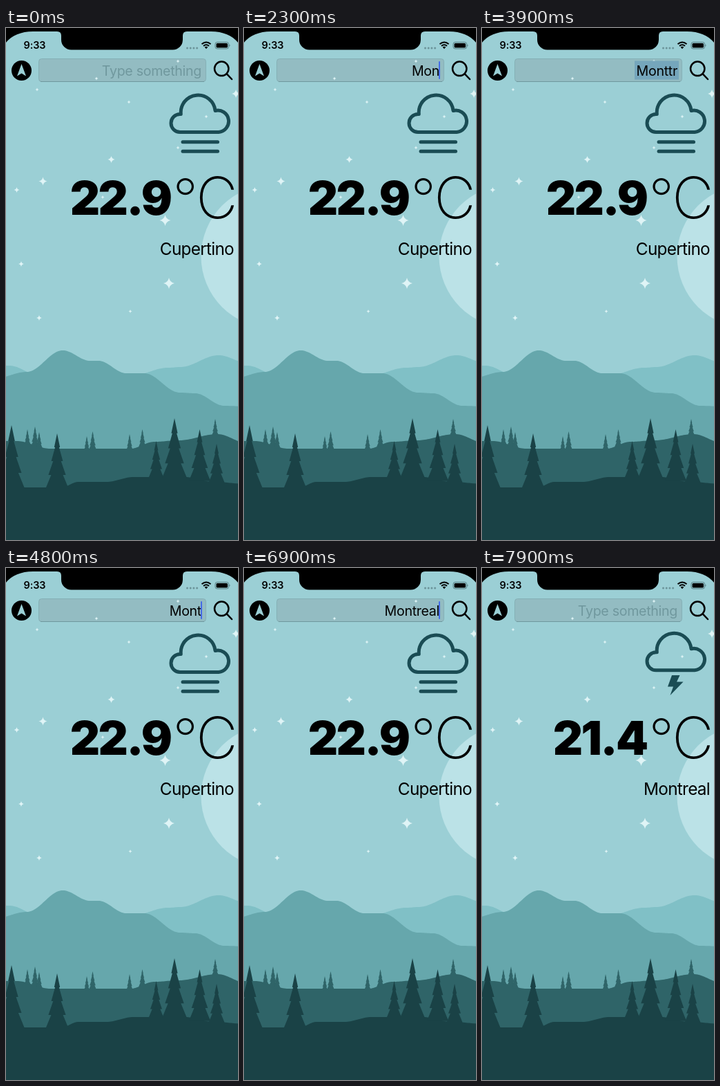
Write an HTML page that moves like this. It is 336 by 740 pixels and loops after 8 s.

```html
<!DOCTYPE html>
<html lang="en">
<head>
<meta charset="utf-8">
<title>Weather</title>
<style>
html, body { margin: 0; width: 100%; height: 100%; overflow: hidden; background: #000; }
svg { display: block; width: 336px; height: 740px; }
text { font-family: Inter, "Liberation Sans", sans-serif; }
.end { text-anchor: end; }
.input { font-size: 19.6px; letter-spacing: -.3px; }
.line { fill: none; stroke: #1a4c54; stroke-width: 5; stroke-linecap: round; stroke-linejoin: round; }
</style>
</head>
<body>
<svg viewBox="0 0 336 740">
  <rect width="336" height="740" fill="#9bcfd5"/>
  <circle cx="386" cy="330" r="103.5" fill="#bbe2e7"/>
  <g id="land"></g>

  <rect x="47.5" y="44.5" width="242" height="33" rx="4" fill="#787880" fill-opacity=".22" stroke="#7aa3a9" stroke-opacity=".6"/>
  <path d="M50 77.5H287" stroke="#6f989e"/>
  <path id="stars" fill="#dff4f6"/>
  <rect id="selection" x="221" y="47.5" width="64" height="27" fill="#75a6bc"/>
  <text id="hint" class="input end" x="283" y="69" fill="#70989e">Type something</text>
  <text id="input" class="input end" x="283" y="69"></text>
  <rect id="caret" x="282" y="48" width="2" height="26" rx="1" fill="#446be8"/>

  <circle cx="22.5" cy="61.5" r="14.5"/>
  <path d="M22.5 52L29 69.5L22.5 65.5L16 69.5Z" fill="#9bcfd5"/>
  <g fill="none" stroke="#000" stroke-width="2.5" stroke-linecap="round">
    <circle cx="312.2" cy="58.8" r="10.2"/>
    <path d="M319.5 66.2L327 74"/>
  </g>

  <path id="cloud" class="line" d="M252 150.5A13 13 0 0 1 252 124.5H253.3A24.9 24.9 0 0 1 303 119.5A15.75 15.75 0 1 1 308 150.5Z"/>
  <path id="fog" class="line" d="M256 164.7H306.5M256 178.3H306.5"/>
  <path id="bolt" d="M275 155H286.5L282 164.5H291.5L272.5 184L277 171.5H269Z" fill="#1a4c54"/>

  <text id="degrees" class="end" x="238.7" y="269.7" font-size="67" font-weight="900" letter-spacing="-2.4"></text>
  <text x="241.5" y="275" font-size="80" font-weight="200">°</text>
  <text class="end" x="335.5" y="275" font-size="83" font-weight="200">C</text>
  <text id="city" class="end" x="330" y="328" font-size="24.3" letter-spacing="-.7"></text>

  <path d="M0 0H336V21C328 11 314 5 297 5H262Q256 5 256 11V17A14.5 14.5 0 0 1 241.5 31.5H94.5A14.5 14.5 0 0 1 80 17V11Q80 5 74 5H39C22 5 8 11 0 21Z"/>
  <text x="25.5" y="30.3" font-size="14.5" font-weight="600" letter-spacing="-.1">9:33</text>
  <path d="M262.5 29H277" stroke="#6c949a" stroke-width="3" stroke-linecap="round" stroke-dasharray="0 4.7"/>
  <path d="M283.5 23.3Q290 17.7 296.5 23.3M286 26Q290 22.6 294 26" fill="none" stroke="#000" stroke-width="2"/>
  <path d="M287.6 27.6Q290 25.7 292.4 27.6L290 30.2Z"/>
  <rect x="303" y="20.5" width="19.5" height="9.5" rx="2.8" fill="none" stroke="#567c82"/>
  <rect x="304.5" y="22" width="16.5" height="6.5" rx="1.5"/>
  <path d="M323.5 23.5Q325.5 25.2 323.5 27Z" fill="#567c82"/>
</svg>
<script>
const el = id => document.getElementById(id);
const shape = (color, points) => `<path fill="${color}" d="M${points.join("L")}Z"/>`;

// Ridge height at x: cosine easing between key points
const ridge = (...keys) => x => {
  const i = keys.findIndex(k => k[0] > x);
  const [x0, y0] = keys[i - 1], [x1, y1] = keys[i];
  return y0 + (y1 - y0) * (1 - Math.cos(Math.PI * (x - x0) / (x1 - x0))) / 2;
};

function hill(color, height) {
  const points = ["336 740", "0 740"];
  for (let x = 0; x <= 336; x += 2) points.push(`${x} ${height(x)}`);
  return shape(color, points);
}

// Four-tier firs standing on a ridge
function firs(color, height, tops) {
  return tops.map(([x, top]) => {
    const tall = height(x) + 2 - top, right = [], left = [];
    for (let tier = 1; tier <= 4; tier++) {
      for (const inset of tier < 4 ? [1, .68] : [1]) {
        const w = .21 * tall * tier / 4 * inset, y = top + tall * tier / 4;
        right.push(`${x + w} ${y}`);
        left.unshift(`${x - w} ${y}`);
      }
    }
    return shape(color, [`${x} ${top}`, ...right, ...left]);
  }).join("");
}

const far = ridge([-10, 488], [5, 488], [50, 503], [180, 503], [235, 491], [252, 490], [308, 473], [350, 484]);
const mid = ridge([-15, 506], [30, 497], [82, 466], [122, 481], [134, 481], [174, 499], [200, 499], [252, 527], [274, 528], [316, 546], [350, 547]);
const low = ridge([-10, 597], [15, 597], [65, 608], [180, 608], [215, 598], [250, 596], [306, 587], [350, 600]);
const near = ridge([-10, 664], [80, 664], [105, 656], [145, 656], [185, 649], [260, 649], [300, 656], [350, 659]);

el("land").innerHTML =
  hill("#80c0c6", far) + hill("#66a7ac", mid) + hill("#2f6468", low) +
  firs("#2f6468", low, [[31, 580], [42, 576], [48, 584], [117, 590], [125.5, 583], [179, 587], [197.5, 580], [303, 565]]) +
  hill("#1a4246", near) +
  firs("#1a4246", near, [[8, 574], [74, 586], [217.5, 597], [244, 564], [280.5, 580], [305, 601]]);

// Four-pointed star; most are specks
function star([x, y, r = 2.5]) {
  const k = r * .17;
  return `M${x} ${y - r}Q${x + k} ${y - k} ${x + r} ${y}Q${x + k} ${y + k} ${x} ${y + r}` +
    `Q${x - k} ${y + k} ${x - r} ${y}Q${x - k} ${y - k} ${x} ${y - r}Z`;
}
el("stars").setAttribute("d", [
  [230.5, 278, 8], [236, 369, 8], [53.5, 221.5, 6], [333, 95, 6], [152.5, 190, 5], [48, 419, 4], [15.5, 234, 4], [22, 341, 4],
  [140, 244.5], [45, 89], [178, 107], [180, 409.5], [249, 173], [290, 128], [249, 48], [131, 73]
].map(star).join(""));

const focus = 600, select = 3900, retype = 4400, submit = 7400, loaded = 7700, loop = 8000;

// Keystrokes as [time, field text]
const type = (from, step, keep, add) => [...add].map((_, i) => [from + step * i, keep + add.slice(0, i + 1)]);
const typing = [
  [0, ""], [focus, ""],
  ...type(1860, 220, "", "Monttr"),
  ...type(retype, 130, "", "Mont"),
  ...type(6000, 180, "Mont", "real"),
  [submit, ""]
];

// Caret stays on for half a second after a key, then blinks with short fades
function blink(age) {
  const p = age % 1000;
  return Math.min(1, Math.max(0, (700 - p) / 200, (p - 900) / 100));
}

function draw(t) {
  const [since, text] = typing.findLast(key => key[0] <= t);
  const selected = t >= select && t < retype;
  const done = t >= loaded;
  const show = (id, on) => el(id).setAttribute("opacity", +on);
  el("input").textContent = text;
  show("hint", !text);
  show("selection", selected);
  show("caret", t >= focus && t < submit && !selected && blink(t - since));
  show("fog", !done);
  show("bolt", done);
  el("cloud").setAttribute("transform", `translate(0 ${done ? -2.7 : 0})`);
  el("degrees").textContent = done ? "21.4" : "22.9";
  el("city").textContent = done ? "Montreal" : "Cupertino";
}

const start = performance.now();
function tick() {
  draw((performance.now() - start) % loop);
  requestAnimationFrame(tick);
}
tick();
</script>
</body>
</html>
```
